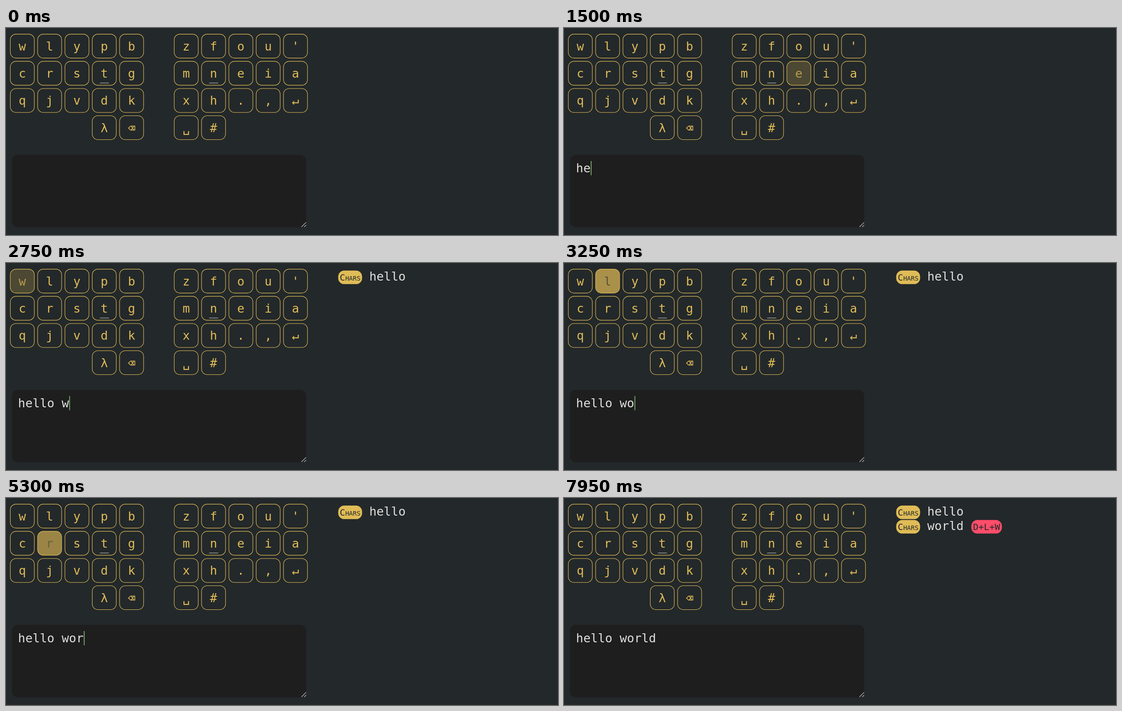
Recreate the animation shown at these times as an HTML page. Size 1219 px wide and 459 px high, loop 8000 ms.

```html
<!DOCTYPE html>
<html lang="en">
<head>
<meta charset="utf-8">
<title>Keyboard layout</title>
<style>
  html, body { margin: 0; width: 100%; height: 100%; overflow: hidden; background: #23282a; }
  svg { display: block; width: 1219px; height: 459px; }
  text { font-family: "DejaVu Sans Mono", monospace; font-size: 26.7px; white-space: pre; }
  .key rect { fill: #e0bc57; stroke: #e0bc57; stroke-width: 1.1; }
  .key text { text-anchor: middle; }
  .bump, .grip { stroke: #c9c9c7; stroke-width: 1.1; fill: none; }
  .typed { fill: #e0e0de; }
  .pill text { font-size: 20px; fill: #23282a; text-anchor: middle; }
  .caps { font-variant: small-caps; }
</style>
</head>
<body>
<svg viewBox="0 0 1219 459">
  <g id="keys"></g>
  <rect x="13" y="281.3" width="650" height="160.5" rx="13.3" fill="#1e1e1f"/>
  <path class="grip" d="M652.5 441L662.8 430.8M658.7 441L662.8 436.9"/>
  <text id="line" class="typed" x="26.6" y="320"></text>
  <rect id="caret" y="295" width="1.5" height="31.5" fill="#8cc97c"/>
  <g id="rows"></g>
</svg>
<script>
const LOOP = 8000, FADE = 400, BLINK = 500, ADVANCE = 16.1;
const GOLD = [224, 188, 87], DARK = [35, 40, 42];
const NS = "http://www.w3.org/2000/svg";
const $ = id => document.getElementById(id);

function add(parent, tag, attrs, text) {
  const el = document.createElementNS(NS, tag);
  for (const k in attrs) el.setAttribute(k, attrs[k]);
  if (text) el.textContent = text;
  parent.appendChild(el);
  return el;
}

// Keyboard
const layout = ["wlypb zfou'", "crstg mneia", "qjvdk xh.,↵", "   λ⌫ ␣#"];
const keys = {};
layout.forEach((row, r) => [...row].forEach((ch, c) => {
  if (ch === " ") return;
  const x = 9.5 + c * 60.33, y = 13.6 + r * 60.3;
  const g = add($("keys"), "g", { class: "key" });
  const rect = add(g, "rect", { x, y, width: 53, height: 53, rx: 12.5 });
  const label = add(g, "text", { x: x + 26.5, y: y + 36 }, ch);
  if (ch === "t" || ch === "n") {
    add(g, "path", { class: "bump", d: `M${x + 16.8} ${y + 108.3 - 60.3}h20` });
  }
  keys[ch] = { rect, label, taps: [] };
}));

// Key, time pressed, time released; the character lands on release
const taps = [
  ["h", 520, 1100], ["e", 1432, 1498], ["l", 1540, 1620], ["l", 1660, 1740],
  ["o", 1770, 1905], ["␣", 1882, 2150], ["w", 2500, 2650], ["o", 2740, 2880],
  ["l", 3082, 3600], ["⌫", 4000, 4300], ["r", 5152, 5299], ["l", 5470, 5620],
  ["d", 5720, 5960], ["␣", 5830, 6245]
];
taps.forEach(([ch, down, up]) => keys[ch].taps.push({ down, up }));

// Result rows
function pill(parent, x, y, w, color, label, cls) {
  const g = add(parent, "g", { class: "pill" });
  add(g, "rect", { x, y, width: w, height: 30, rx: 13.3, fill: color });
  add(g, "text", { x: x + w / 2, y: y + 21.8, class: cls }, label);
}
function resultRow(y, word, chord) {
  const g = add($("rows"), "g", {});
  pill(g, 733.6, y, 52.8, "#e0bc57", "Chars", "caps");
  add(g, "text", { class: "typed", x: 802.2, y: y + 21.8 }, word);
  if (chord) pill(g, 899.5, y, 67.5, "#ff4d6a", chord, "");
  return g;
}
const rows = [
  { el: resultRow(16.8, "hello"), at: 2200 },
  { el: resultRow(48.8, "world", "D+L+W"), at: 6300 }
];

// CSS "ease": cubic-bezier(.25, .1, .25, 1)
function ease(x) {
  if (x <= 0) return 0;
  if (x >= 1) return 1;
  let lo = 0, hi = 1, s;
  for (let i = 0; i < 20; i++) {
    s = (lo + hi) / 2;
    const px = 0.75 * s * (1 - s) + s * s * s;
    if (px < x) lo = s; else hi = s;
  }
  return 0.3 * s * (1 - s) * (1 - s) + 3 * s * s * (1 - s) + s * s * s;
}

// A release part way up fades back in proportionally less time
function level({ down, up }, t) {
  if (t < up) return ease((t - down) / FADE);
  const peak = ease((up - down) / FADE);
  return peak * (1 - ease((t - up) / (FADE * peak)));
}

const mix = (a, b, k) => `rgb(${a.map((v, i) => Math.round(v + (b[i] - v) * k))})`;

function caretOpacity(since) {
  if (since < 0) return 0;
  const p = since % (2 * BLINK);
  return p < BLINK ? 1 : Math.max(0, 1 - (p - BLINK) / 100);
}

function draw(t) {
  for (const ch in keys) {
    const { rect, label, taps } = keys[ch];
    const k = taps.reduce((m, tap) => Math.max(m, level(tap, t)), 0);
    rect.setAttribute("fill-opacity", k.toFixed(3));
    label.setAttribute("fill", mix(GOLD, DARK, k));
  }

  let line = "", last = 300;
  for (const [ch, , up] of taps) {
    if (t < up) continue;
    line = ch === "⌫" ? line.slice(0, -1) : line + (ch === "␣" ? " " : ch);
    last = up;
  }
  $("line").textContent = line;
  const caret = $("caret");
  caret.setAttribute("x", 27 + line.length * ADVANCE);
  const fadeIn = Math.min(1, (t - 250) / 100);
  caret.setAttribute("opacity", t < 300 ? 0 : Math.min(fadeIn, caretOpacity(t - last)));

  rows.forEach(({ el, at }) => el.setAttribute("visibility", t >= at ? "visible" : "hidden"));
}

const start = performance.now();
function tick() {
  draw((performance.now() - start) % LOOP);
  requestAnimationFrame(tick);
}
tick();
</script>
</body>
</html>
```
